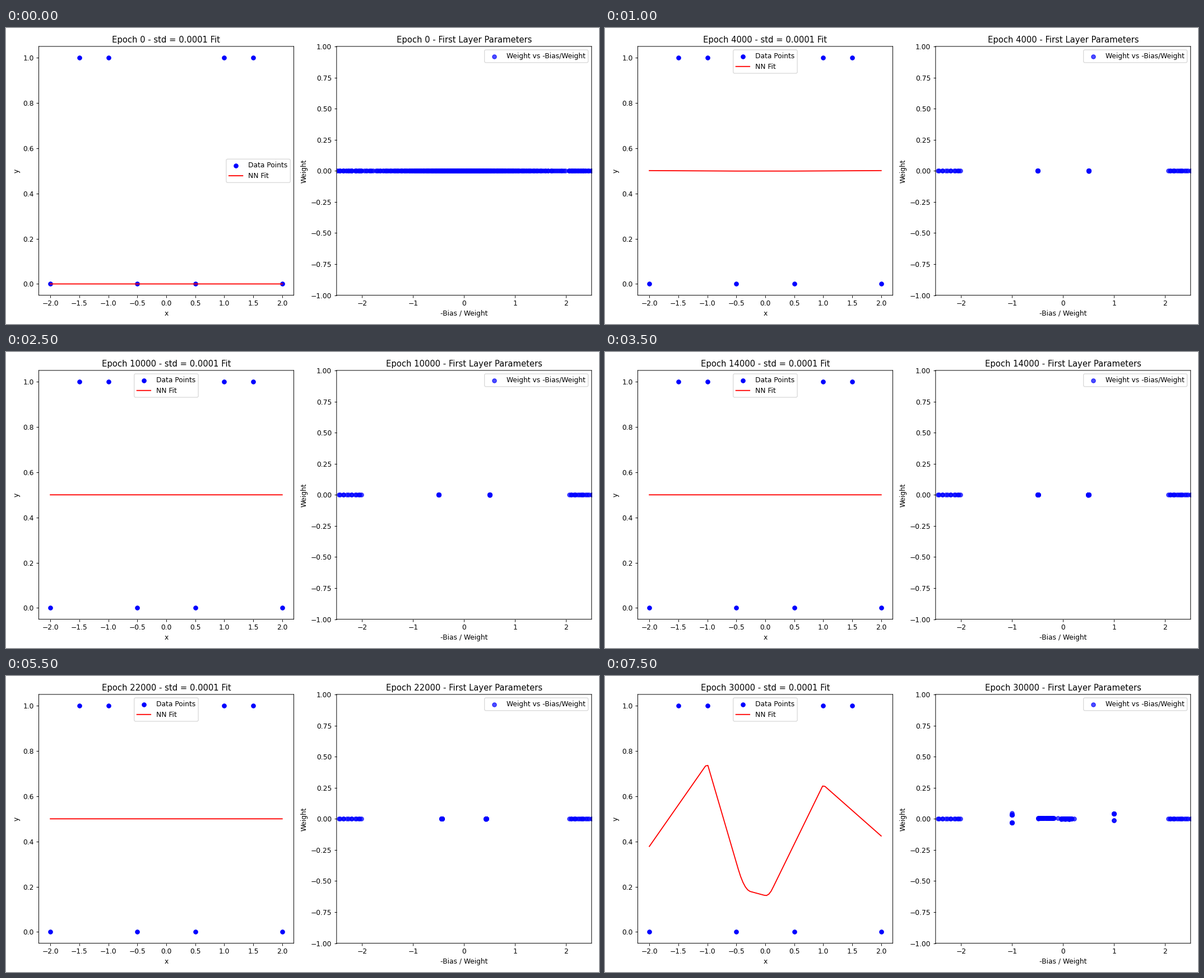
Recreate the animation shown at these times as a matplotlib script. Size 1058 by 529 pixels, loop 8000 ms.

```python
import numpy as np
import matplotlib.pyplot as plt
from matplotlib.animation import FuncAnimation

DPI, LAYOUT_DPI = 1058 / 12, 100
STEPS, STEP_MS, EPOCHS_PER_STEP = 16, 500, 2000
LAST = STEPS - 1

# Soft, unsnapped edges, as in a figure scaled down from the layout size
plt.rcParams["path.snap"] = False
rng = np.random.default_rng(4)

data_x = np.array([-2, -1.5, -1, -0.5, 0.5, 1, 1.5, 2])
data_y = (np.abs(np.abs(data_x) - 1.25) < 0.5).astype(float)
grid = np.linspace(-2, 2, 100)


def cauchy(lo, hi, n):
    """Evenly filled but jittered sample of a ratio of two normals."""
    a, b = np.arctan([lo, hi])
    return np.tan(a + (b - a) * (np.arange(n) + rng.uniform(0, 1, n)) / n)


# Kinks outside the data range never train; the others do
dead = np.concatenate([cauchy(-2.5, -2.0, 13), cauchy(2.04, 2.5, 15)])
start = cauchy(-2.5, 2.5, 330)
side = np.where(np.arange(150) % 2, 1.0, -1.0)
spread = rng.uniform(0, 1, side.size)
noise = rng.normal(0, 1, side.size)

# Each cluster drifts inward, then spreads: distance of its two ends from zero
KEY_STEPS = [6, 9, 11, 13, 14]
NEAR = [0.497, 0.478, 0.430, 0.36, 0.01]
FAR = [0.503, 0.500, 0.440, 0.41, 0.50]

# Final groups of kinks: from, to, weight, count
GROUPS = [(-0.49, -0.18, 0.005, 60), (-0.04, 0.17, 0.0, 60),
          (-0.10, -0.10, 0.003, 1), (0.215, 0.215, 0.0, 1),
          (-1, -1, 0.045, 1), (-1, -1, 0.034, 8), (-1, -1, -0.029, 8),
          (1, 1, 0.042, 8), (1, 1, -0.011, 2)]

# Final fit: kink position, width, change of slope
HINGES = [(-1, 0, -1.242), (-0.361, 0.2, 0.806),
          (0.0585, 0.12, 0.593), (1, 0, -0.750)]


def points(x, w=0.0):
    return np.column_stack([x, np.broadcast_to(w, np.shape(x))])


def group(lo, hi, w, n):
    return points(lo + (hi - lo) * spread[:n], w + 0.0008 * noise[:n])


def hinge(center, width, slope):
    kinks_at = center + width * np.linspace(-0.5, 0.5, 21)
    return slope * np.maximum(grid[:, None] - kinks_at, 0).mean(axis=1)


def kinks(step):
    if step == 0:
        moving = points(start)
    elif step == LAST:
        moving = np.vstack([group(*g) for g in GROUPS])
    else:
        near = np.interp(step, KEY_STEPS, NEAR)
        far = np.interp(step, KEY_STEPS, FAR)
        moving = points(side * (near + (far - near) * spread), 0.0004 * noise)
    return np.vstack([points(dead), moving])


def fit(step):
    if step == 0:
        return np.zeros_like(grid)
    if step == LAST:
        return 0.378 + 0.367 * (grid + 2) + sum(hinge(*h) for h in HINGES)
    bend = 0.015 * 0.07 ** (step - 1)
    return 0.5 + bend * (np.maximum(np.abs(grid) - 0.5, 0) / 0.75 - 1)


fig, (ax_fit, ax_par) = plt.subplots(1, 2, figsize=(12, 6), dpi=DPI)

ax_fit.scatter(data_x, data_y, color="blue", label="Data Points")
line, = ax_fit.plot(grid, fit(0), color="red", label="NN Fit")
ax_fit.set(xlim=(-2.2, 2.2), ylim=(-0.05, 1.05), xlabel="x", ylabel="y")
ax_fit.set_xticks(np.arange(-2, 2.1, 0.5))
legend = ax_fit.legend(loc="center right")

dots = ax_par.scatter(*kinks(0).T, color="blue", alpha=0.7,
                      label="Weight vs -Bias/Weight")
ax_par.set(xlim=(-2.5, 2.5), ylim=(-1, 1), xlabel="-Bias / Weight", ylabel="Weight")
ax_par.legend(loc="upper right")


def update(step):
    epoch = step * EPOCHS_PER_STEP
    ax_fit.set_title(f"Epoch {epoch} - std = 0.0001 Fit")
    ax_par.set_title(f"Epoch {epoch} - First Layer Parameters")
    line.set_ydata(fit(step))
    legend.set_loc("upper center" if step else "center right")
    dots.set_offsets(kinks(step))
    return line, dots


update(0)
fig.set_dpi(LAYOUT_DPI)
fig.tight_layout()
fig.set_dpi(DPI)

anim = FuncAnimation(fig, update, frames=STEPS, interval=STEP_MS,
                     repeat=True, repeat_delay=0)
plt.show()
```
